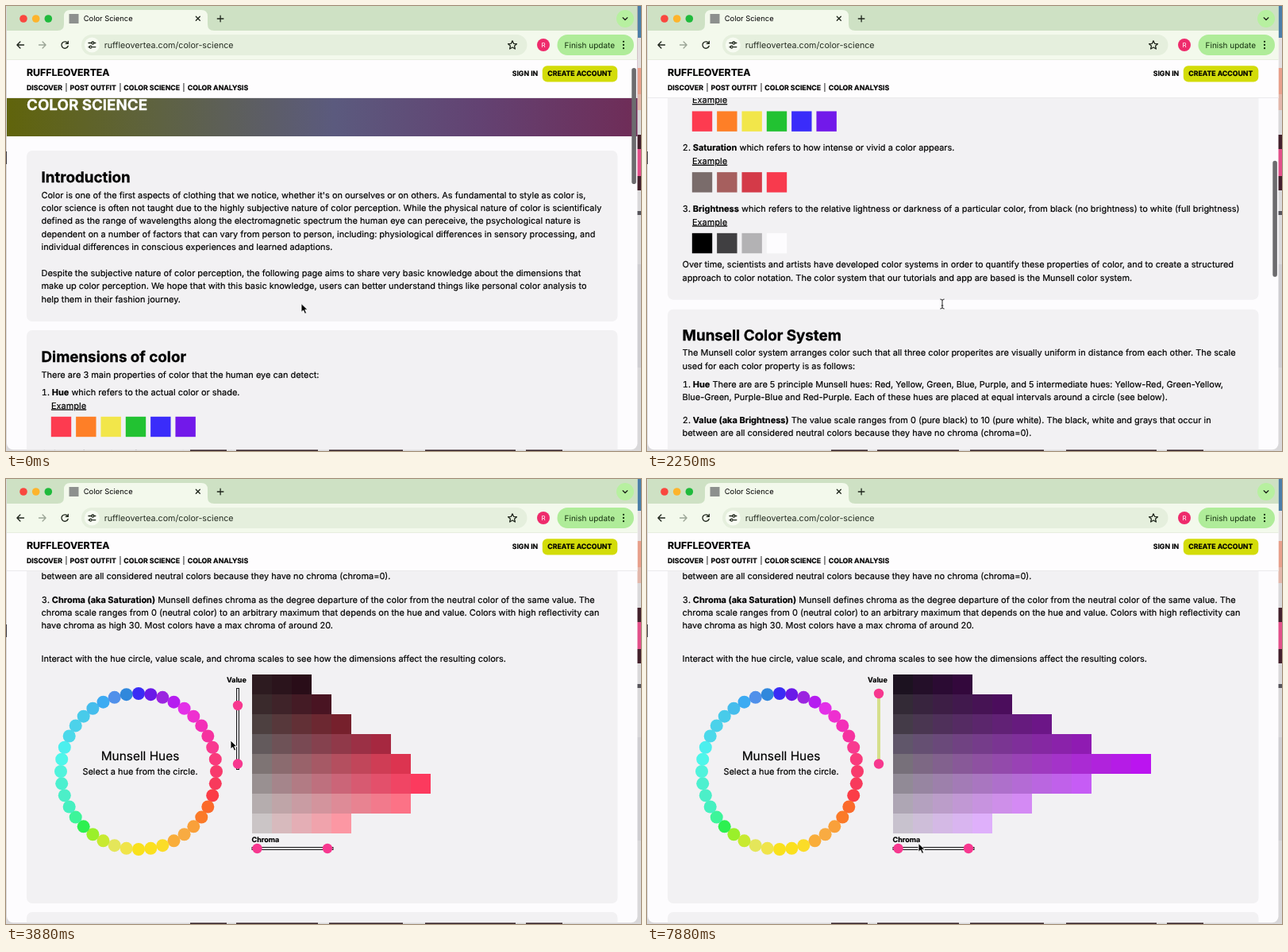
These frames come from a looping animation (800x560 px, 8000 ms). An HTML page:

```html
<!DOCTYPE html>
<html lang="en">
<head>
<meta charset="utf-8">
<title>Color Science</title>
<style>
html, body { margin: 0; width: 100%; height: 100%; overflow: hidden; background: #d9d8da; }
svg { display: block; width: 800px; height: 560px; font-family: Inter, "Open Sans", sans-serif; text-rendering: geometricPrecision; }
text { font-size: 10.965px; fill: var(--ink, #000); stroke: var(--ink, #000); stroke-width: .18px; }
.b { font-weight: 700; }
.h { font-size: 18.77px; font-weight: 700; stroke-width: .3px; }
.nav { font-size: 8.74px; font-weight: 700; }
.label { font-size: 9px; font-weight: 700; }
.marker { font-variant-numeric: tabular-nums; text-anchor: end; }
.ui { stroke: none; }
.line { fill: none; stroke: #1f261c; stroke-width: 1.3; stroke-linecap: round; stroke-linejoin: round; }
</style>
</head>
<body>
<svg id="stage" viewBox="0 0 800 560" width="800" height="560"></svg>
<script>
const LOOP = 8000, STEP = 125;
const PINK = '#f7388f', LINE = 16.4, LEFT = 44.5;

// Markup helpers
const rect = (x, y, w, h, fill, more = '') =>
  `<rect x="${x}" y="${y}" width="${w}" height="${h}" fill="${fill}" ${more}/>`;
const disc = (x, y, r, fill, more = '') =>
  `<circle cx="${x}" cy="${y}" r="${r}" fill="${fill}" ${more}/>`;
const text = (x, y, s, more = '') => `<text x="${x}" y="${y}" ${more}>${s}</text>`;
const line = (d, more = '') => `<path class="line" d="${d}" ${more}/>`;
const lines = (y, rows) => rows.map((s, i) => text(LEFT, y + i * LINE, s)).join('');
const heading = (y, s) => text(LEFT, y, s, 'class="h"');
const card = (y, h) => rect(26, y, 744.5, h, '#f2f1f3', 'rx="7"');
const item = (n, y, name, rest) =>
  text(54.9, y, n + '.', 'class="marker"') +
  text(57.8, y, `<tspan class="b">${name}</tspan> ${rest}`);

function property(n, name, rest, colors) {
  const y = 490 + (n - 1) * 76.7;
  return item(n, y, name, rest) +
    text(57, y + 16.5, 'Example', 'text-decoration="underline"') +
    colors.map((c, i) => rect(56.8 + i * 31.33, y + 26.8, 25.4, 25.4, c)).join('');
}

// Colour chart: [cells, neutral end, vivid end] per row
const CHARTS = {
  red: [
    [3, '2d1b20', '290d18'], [4, '3a2a2c', '491422'], [5, '4d4040', '76202c'], [7, '635a5c', 'a62840'],
    [8, '7e7474', 'dc3450'], [9, '999091', 'fc3a5e'], [8, 'b5adae', 'fc7286'], [5, 'cbc5c6', 'fc97a3']],
  purple: [
    [4, '1c1220', '33083c'], [6, '332a36', '4b0d5c'], [8, '443b48', '6c1687'], [10, '60566a', '8f1bb2'],
    [13, '77707a', 'bb14f0'], [10, '918a96', 'c65cf5'], [7, 'aea6b4', 'd48af4'], [5, 'c8c2ce', 'dfb0fb']]
};
const channels = hex => [0, 2, 4].map(i => parseInt(hex.slice(i, i + 2), 16));
function blend(a, b, p) {
  const to = channels(b);
  return `rgb(${channels(a).map((v, i) => Math.round(v + (to[i] - v) * p))})`;
}
const chart = name => `<g id="${name}" shape-rendering="crispEdges">` +
  CHARTS[name].map(([n, a, b], row) =>
    Array.from({ length: n }, (_, i) =>
      rect(310 + i * 25, 1045 + row * 25, 25, 25, blend(a, b, i / (n - 1)))).join('')).join('') + '</g>';

const HUES = ('3a2cf5 6a1ae8 9b25e0 b51df0 e330e8 ee30d0 f32fb8 f6329f f83a90 f93a7c ' +
  'f83a6c f83a5c fb3d47 fb6a2a fb7a28 f9a03a f8ab42 f9ad3a fbdc28 fbe01e ' +
  'f9e11c f0e44a e4e65a c8ea30 9af02a 2df050 3df59a 46f0c0 4cefc8 4cf0cf ' +
  '50f3dc 4ef6ea 4cefee 4cd9ea 4cd2ea 48cbea 45bdec 3cabf2 5090ea 3088dc').split(' ');
const hueCircle = HUES.map((c, i) => {
  const a = i * Math.PI / 20;
  return disc((167 + 98 * Math.sin(a)).toFixed(2), (1167 - 98 * Math.cos(a)).toFixed(2), 8, '#' + c);
}).join('');

const page =
  rect(0, 0, 796, 164, 'url(#hero)') +
  text(26, 131, 'COLOR SCIENCE', 'class="h" style="--ink:#fff"') +
  card(182, 215) + heading(222, 'Introduction') +
  lines(241.5, [
    "Color is one of the first aspects of clothing that we notice, whether it's on ourselves or on others. As fundamental to style as color is,",
    'color science is often not taught due to the highly subjective nature of color perception. While the physical nature of color is scientificaly',
    'defined as the range of wavelengths along the electromagnetic spectrum the human eye can pereceive, the psychological nature is',
    'dependent on a number of factors that can vary from person to person, including: physiological differences in sensory processing, and',
    'individual differences in conscious experiences and learned adaptions.',
    '',
    'Despite the subjective nature of color perception, the following page aims to share very basic knowledge about the dimensions that',
    'make up color perception. We hope that with this basic knowledge, users can better understand things like personal color analysis to',
    'help them in their fashion journey.']) +
  card(408, 346) + heading(448, 'Dimensions of color') +
  lines(467.5, ['There are 3 main properties of color that the human eye can detect:']) +
  property(1, 'Hue', 'which refers to the actual color or shade.',
    ['#fd3b50', '#fe7f27', '#f2e64a', '#22c232', '#3a2cfa', '#7219ea']) +
  property(2, 'Saturation', 'which refers to how intense or vivid a color appears.',
    ['#7a6c6b', '#a65f5e', '#d43a48', '#f83a4d']) +
  property(3, 'Brightness', 'which refers to the relative lightness or darkness of a particular color, from black (no brightness) to white (full brightness)',
    ['#000', '#403f41', '#b3b2b4', '#fdfcfe']) +
  lines(713.5, [
    'Over time, scientists and artists have developed color systems in order to quantify these properties of color, and to create a structured',
    'approach to color notation. The color system that our tutorials and app are based is the Munsell color system.']) +
  card(766, 567) + heading(805, 'Munsell Color System') +
  lines(824.5, [
    'The Munsell color system arranges color such that all three color properites are visually uniform in distance from each other. The scale',
    'used for each color property is as follows:']) +
  item(1, 864, 'Hue', 'There are are 5 principle Munsell hues: Red, Yellow, Green, Blue, Purple, and 5 intermediate hues: Yellow-Red, Green-Yellow,') +
  lines(880.4, ['Blue-Green, Purple-Blue and Red-Purple. Each of these hues are placed at equal intervals around a circle (see below).']) +
  item(2, 909, 'Value (aka Brightness)', 'The value scale ranges from 0 (pure black) to 10 (pure white). The black, white and grays that occur in') +
  lines(925.4, ['between are all considered neutral colors because they have no chroma (chroma=0).']) +
  item(3, 954.5, 'Chroma (aka Saturation)', 'Munsell defines chroma as the degree departure of the color from the neutral color of the same value. The') +
  lines(970.9, [
    'chroma scale ranges from 0 (neutral color) to an arbitrary maximum that depends on the hue and value. Colors with high reflectivity can',
    'have chroma as high 30. Most colors have a max chroma of around 20.']) +
  lines(1028.5, ['Interact with the hue circle, value scale, and chroma scales to see how the dimensions affect the resulting colors.']) +
  hueCircle +
  text(169, 1152.5, 'Munsell Hues', 'text-anchor="middle" style="font-size:15.4px"') +
  text(169, 1171, 'Select a hue from the circle.', 'text-anchor="middle"') +
  text(278, 1055.3, 'Value', 'class="label"') +
  rect(290.5, 1062.5, 3, 102, '#dedde0', 'id="idleTrack" stroke="#1c1b1d"') +
  rect(290, 1069, 4, 88, '#d6df8b', 'id="liveTrack"') +
  disc(292, 1084, 6.2, PINK, 'id="thumb"') + disc(292, 1157.5, 6.2, PINK) +
  chart('red') + chart('purple') +
  text(309.5, 1255.5, 'Chroma', 'class="label"') +
  rect(310, 1262.5, 102, 3, '#dedde0', 'stroke="#1c1b1d"') +
  disc(316.5, 1264, 6.2, PINK) + disc(405, 1264, 6.2, PINK) +
  card(1344, 300);

const siteHeader =
  rect(0, 68, 796, 48, '#fefdfe') + rect(0, 115.3, 796, 0.7, '#e4e3e5') +
  text(26, 88, 'RUFFLEOVERTEA', 'class="b" style="font-size:12.3px"') +
  [[26, 'DISCOVER'], [80.5, 'POST OUTFIT'], [148.3, 'COLOR SCIENCE'], [228.7, 'COLOR ANALYSIS']]
    .map(([x, s]) => text(x, 105.8, s, 'class="nav"')).join('') +
  [75.5, 143.5, 223.5].map(x => rect(x, 97, 0.9, 11, '#111')).join('') +
  text(637.7, 88.3, 'SIGN IN', 'class="nav"') +
  rect(675.8, 75.2, 94.5, 20.2, '#d3dc09', 'rx="6"') +
  text(682.2, 88.3, 'CREATE ACCOUNT', 'class="nav"');

const browser =
  rect(0, 0, 796, 40, '#cee1c4') +
  rect(0, 31, 796, 37, '#f3f9ec') + rect(0, 67.4, 796, 0.6, '#dfe6d8') +
  '<path d="M65 31q8 0 8-8V13q0-8 8-8H246q8 0 8 8V23q0 8 8 8Z" fill="#f3f9ec"/>' +
  disc(22, 16, 4.8, '#f9473f') + disc(37.7, 16, 4.8, '#fdb42c') + disc(53.3, 16, 4.8, '#1fba3c') +
  rect(79.5, 10, 12, 12, '#8d908e') +
  text(97.8, 19.4, 'Color Science', 'class="ui" style="font-size:9.35px"') +
  line('M239.3 13.3l5 5m0-5l-5 5') + line('M266.3 16h7.6m-3.8-3.8v7.6') +
  disc(780, 16, 11, '#b7f0a0') + line('M777.2 14.7l2.8 2.8l2.8-2.8') +
  line('M22.5 49h-8.6m4-4l-4 4l4 4') +
  line('M41.5 49h8.6m-4-4l4 4l-4 4', 'style="stroke:#9ba596"') +
  line('M77.6 46.6A4.2 4.2 0 1 0 78.2 50.3M78.3 44.4v3h-3') +
  rect(95, 36, 561.5, 26, '#e5efdd', 'rx="13"') + disc(108.3, 49, 9.5, '#f7fbf2') +
  line('M104 46.5h3.6m3.6 0h1.6M104 51.6h1.4m3.6 0h3.8') +
  '<g class="line"><circle cx="109.3" cy="46.5" r="1.5"/><circle cx="106.6" cy="51.6" r="1.5"/></g>' +
  text(123.7, 52.8, 'ruffleovertea.com/color-science', 'class="ui" style="font-size:10.7px;--ink:#232a20"') +
  line('M638 43.8l1.6 3.5l3.8.4l-2.9 2.5l.9 3.8l-3.4-2l-3.4 2l.9-3.8l-2.9-2.5l3.8-.4Z') +
  disc(677, 49, 8, '#ee2b6c') +
  text(677, 51.9, 'R', 'class="ui" text-anchor="middle" style="font-size:8px;--ink:#fff"') +
  rect(694.5, 36, 96.5, 26, '#afec99', 'rx="13"') +
  text(703.6, 52.6, 'Finish update', 'class="ui" style="font-size:10px;--ink:#14300f"') +
  [44.8, 49, 53.2].map(y => disc(778, y, 1.15, '#14300f')).join('');

// Slivers of the desktop around the window
const desktop = rect(0, 0, 800, 560, '#d9d8da') +
  [[0, 40, '#4b7ea8'], [40, 38, '#e4dfe0'], [78, 33, '#e8a08c'], [111, 20, '#e2b7ab'], [162, 70, '#43202c'],
   [180, 34, '#e2508a'], [258, 5, '#55535a'], [325, 130, '#cfced2']]
    .map(([y, h, c]) => rect(795, y, 5, h, c)).join('') +
  rect(0, 183, 2, 16, '#3a3840') +
  [[232, 46], [290, 103], [407, 93], [528, 114], [655, 46]]
    .map(([x, w]) => rect(x, 557, w, 3, '#352329')).join('');

const cursors =
  '<path id="arrow" d="M0 0V10.8L2.6 8.5L4.5 12.8L6.6 11.9L4.7 7.7H8Z" fill="#000" stroke="#fff" stroke-width=".9"/>' +
  '<path id="beam" d="M-2.6 -5.5Q0 -5.5 0 -3.8Q0 -5.5 2.6 -5.5M0 -4V5M-2.6 6.5Q0 6.5 0 4.8Q0 6.5 2.6 6.5M-1.3 2.5H1.3" fill="none" stroke="#222" stroke-width="1"/>' +
  '<path id="hand" d="M-1.3 .8Q0 -.8 1.2 .8V5L2.4 4.6Q3.6 4.6 3.8 5.4Q5.4 4.9 5.8 6.1Q7.3 5.9 7.3 7.4V9.5L6 13.5H-.2L-3.8 9Q-4.6 7.4 -3 7.2L-1.3 8.6Z" fill="#fff" stroke="#000" stroke-width=".9" stroke-linejoin="round"/>';

const stage = document.getElementById('stage');
stage.innerHTML = `<defs>
  <linearGradient id="hero"><stop offset="0" stop-color="#60640b"/><stop offset=".25" stop-color="#5e6243"/>
  <stop offset=".52" stop-color="#5b5a7e"/><stop offset=".75" stop-color="#634272"/><stop offset="1" stop-color="#6f2c57"/></linearGradient>
  <clipPath id="window"><rect x="1" y="-10" width="794.5" height="568.3" rx="8"/></clipPath></defs>
  ${desktop}<g clip-path="url(#window)">${rect(0, 0, 800, 560, '#fdfcfe')}
  <g id="page">${page}</g>${siteHeader}${browser}${rect(788.3, 78, 5.6, 146, '#6c6b6e', 'id="bar" rx="2.8"')}</g>
  <g id="cursor">${cursors}</g>`;
const part = id => document.getElementById(id);
const show = (id, on) => part(id).setAttribute('visibility', on ? 'visible' : 'hidden');

// Smooth curve through [time, value] keys, flat at turning points and ends
function follow(keys, t) {
  const last = keys.length - 1;
  if (t <= keys[0][0]) return keys[0][1];
  if (t >= keys[last][0]) return keys[last][1];
  const rate = i => (keys[i + 1][1] - keys[i][1]) / (keys[i + 1][0] - keys[i][0]);
  const slope = i => {
    if (i === 0 || i === last) return 0;
    const a = rate(i - 1), b = rate(i);
    return a * b <= 0 ? 0 : 2 * a * b / (a + b);
  };
  const i = keys.findIndex(k => k[0] > t) - 1;
  const w = keys[i + 1][0] - keys[i][0], p = (t - keys[i][0]) / w, q = 1 - p;
  return keys[i][1] * q * q * (1 + 2 * p) + keys[i + 1][1] * p * p * (3 - 2 * p) +
    w * p * q * (slope(i) * q - slope(i + 1) * p);
}

const SCROLL = [[0, 0], [750, 367], [1000, 395], [1750, 255], [2625, 542], [3250, 799]];
const MOUSE = [[3375, 372, 374.5], [3875, 283, 329], [4500, 205, 281], [5125, 205, 281], [5625, 292, 284],
  [5750, 292, 284], [6250, 292, 269], [6500, 292, 269], [7250, 365, 365], [7750, 404, 442.5], [7875, 342, 458.5]];
const MOUSE_X = MOUSE.map(k => [k[0], k[1]]), MOUSE_Y = MOUSE.map(k => [k[0], k[2]]);
const THUMB = [[5750, 1084], [6250, 1069]];

function draw(time) {
  const t = Math.floor(time % LOOP / STEP) * STEP;
  const scroll = follow(SCROLL, t);
  part('page').setAttribute('transform', `translate(0 ${-scroll.toFixed(2)})`);
  part('bar').setAttribute('y', 78 + scroll * 0.304);
  show('bar', t < 3750);

  const picked = t >= 4625, sliding = t >= 5750;
  show('red', !picked);
  show('purple', picked);
  show('idleTrack', !sliding);
  show('liveTrack', sliding);
  part('thumb').setAttribute('cy', follow(THUMB, t));

  const hand = t >= 4375 && t < 5250 || t >= 5500 && t < 6625;
  const beam = t >= 2250 && t < 3000;
  show('hand', hand);
  show('beam', beam);
  show('arrow', !hand && !beam);
  part('cursor').setAttribute('transform', `translate(${follow(MOUSE_X, t)} ${follow(MOUSE_Y, t)})`);
}

const start = performance.now();
function tick() {
  draw(performance.now() - start);
  requestAnimationFrame(tick);
}
draw(0);
requestAnimationFrame(tick);
</script>
</body>
</html>
```
